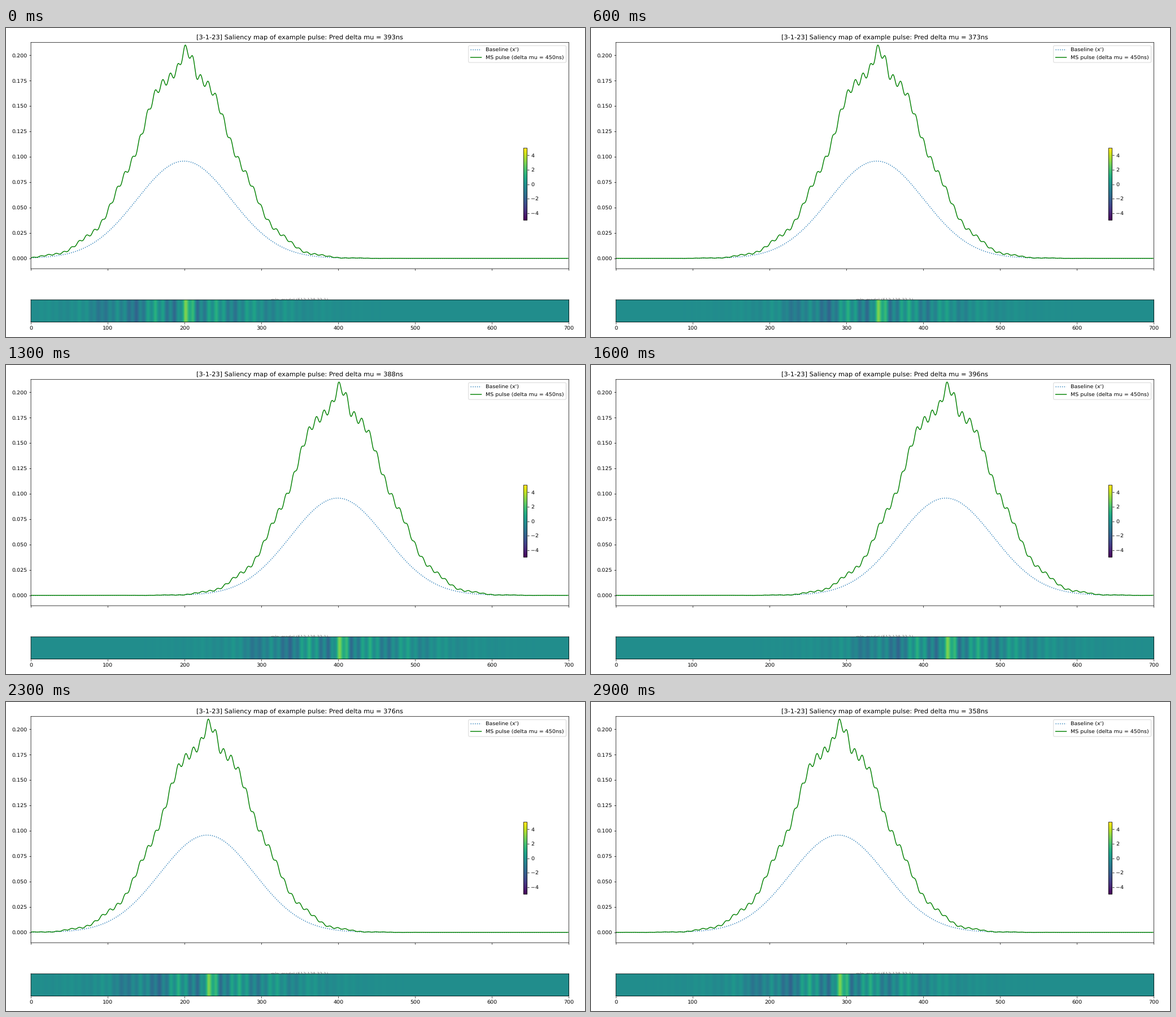
A matplotlib script that plays this animation: 1025x547 px, repeating every 3 s.

```python
import numpy as np
import matplotlib.pyplot as plt
from matplotlib.animation import FuncAnimation

W, H, DPI = 1025, 547, 547 / 8
COUNT = 30
# Unsnapped lines keep their fractional pixel positions
plt.rcParams.update({"font.family": "DejaVu Sans", "text.hinting": "none",
                     "path.snap": False})


def bell(offset, width):
    return np.exp(-offset ** 2 / (2 * width ** 2))


def plateau(offset, width):
    return np.exp(-(offset / width) ** 4)


def wave(offset, period):
    return np.cos(2 * np.pi * offset / period)


def baseline(offset):
    return 0.0957 * bell(offset + 0.7, 61.4)


def ripple(offset):
    """Deviation of the pulse from a clean bell shape."""
    fast = 0.0045 * wave(offset - 11, 9.9)
    slow = 0.005 * wave(np.abs(offset) - 40, 47)
    crest = 0.012 * plateau(offset - 4.5, 9)
    dip = -0.006 * plateau(offset + 95, 38)
    return np.sqrt(bell(offset, 61)) * (fast + slow + crest + dip)


def pulse(offset):
    return 0.1914 * bell(offset, 61) + ripple(offset)


def saliency(offset):
    return (170 * ripple(offset) - 0.1)[None, :]


def add_axes(left, top, right, bottom):
    return fig.add_axes([left / W, 1 - bottom / H,
                         (right - left) / W, (bottom - top) / H])


fig = plt.figure(figsize=(W / DPI, H / DPI), dpi=DPI)
ax = add_axes(44.1, 25.7, 996.3, 426.1)
strip = add_axes(44.1, 481.1, 996.3, 520.6)
cax = add_axes(916.2, 212.7, 922.6, 340.3)

time = np.arange(700)
base_line, = ax.plot(time, baseline(time - 200), ":", color="C0",
                     label="Baseline (x')")
pulse_line, = ax.plot(time, pulse(time - 200), color="green",
                      label="MS pulse (delta mu = 450ns)")
ax.set(xlim=(0, 700), ylim=(-0.0102, 0.2124))
ax.tick_params(labelbottom=False)
ax.legend(loc="upper right", bbox_to_anchor=(1, 0.998))
title = ax.set_title("")
# The strip covers the lower part of this note
ax.text(520 / W, 1 - 483 / H, "mlp_model (512,128,32,1)", fontsize=8,
        color="gray", ha="center", transform=fig.transFigure)

heat = strip.imshow(saliency(time - 200), extent=(0, 700, 0, 1),
                    aspect="auto", cmap="viridis", vmin=-5, vmax=5)
strip.set_yticks([])
fig.colorbar(heat, cax=cax, ticks=range(-4, 5, 2))

# Positions play in alphabetical order: 0, 1, 10, 11, ...
ORDER = sorted(range(COUNT), key=str)


def update(frame):
    place = ORDER[frame]
    offset = time - (200 + 10 * place)
    guess = np.interp(place, [0, 3, 9, 14, 18, 20, 26],
                      [393, 376, 358, 373, 386, 388, 405])
    base_line.set_ydata(baseline(offset))
    pulse_line.set_ydata(pulse(offset))
    heat.set_data(saliency(offset))
    title.set_text("[3-1-23] Saliency map of example pulse: "
                   f"Pred delta mu = {guess:.0f}ns")
    return base_line, pulse_line, heat, title


anim = FuncAnimation(fig, update, frames=COUNT, interval=100, repeat=True)
plt.show()
```
